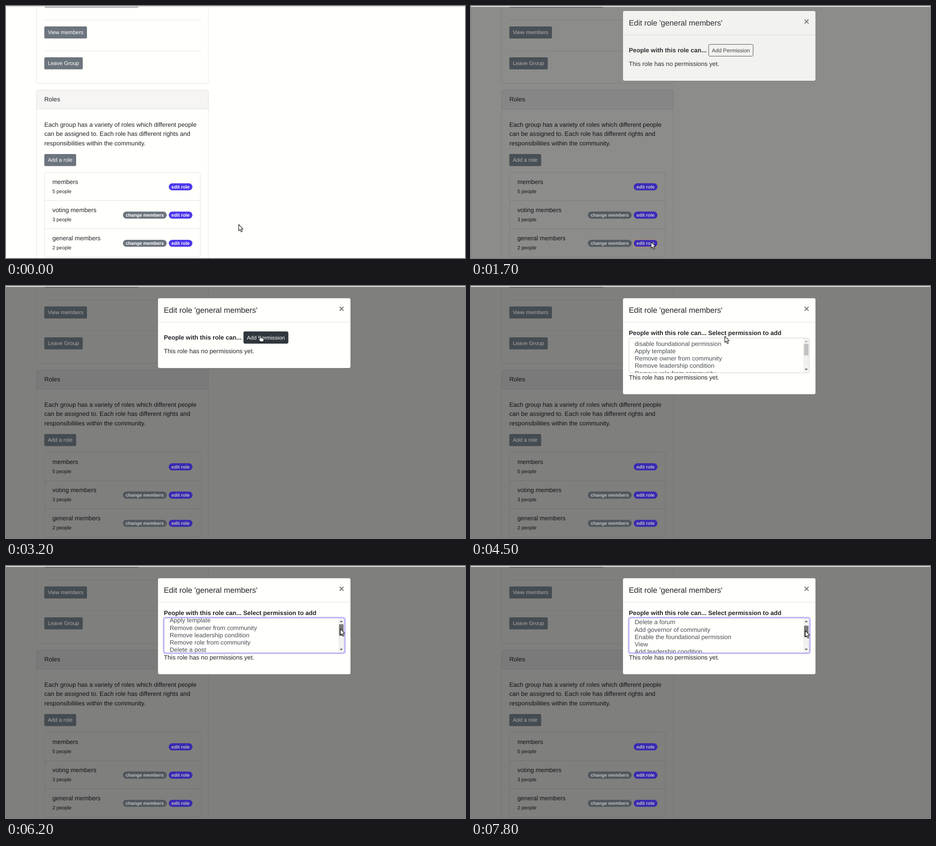
Animation, 1009 px wide and 555 px high, one loop 8 s. Source, as an HTML page:

```html
<!DOCTYPE html>
<html lang="en">
<head>
<meta charset="utf-8">
<title>Edit role dialog</title>
<style>
html, body { margin: 0; width: 100%; height: 100%; overflow: hidden; background: #fffffb; }
svg { display: block; width: 1009px; height: 555px; }
text {
  font: 13.6px "Liberation Sans", Arial, sans-serif;
  fill: #212529;
  text-rendering: geometricPrecision;
  white-space: pre;
}
.small { font-size: 10.88px; }
.bold { font-weight: 700; }
.title { font-size: 17px; }
.close { font-size: 20.4px; font-weight: 700; fill: #000; opacity: .5; }
.btn rect { fill: #6c757d; }
.btn text { font-size: 11.9px; fill: #fff; }
.badge rect { fill: #6c757d; }
.badge .main { fill: #4c38ec; }
.badge text { font-size: 10.2px; font-weight: 700; fill: #fff; }
.line { fill: none; stroke: #000; stroke-opacity: .125; stroke-width: .9; }
.options text { fill: #495057; }

.anim, .anim * { animation: 8s step-end infinite; }
#dim { opacity: 0; animation-name: dim; }
#modal { opacity: 0; animation-name: modal; }
#panel { height: 154.6px; animation-name: panel; }
#outline { opacity: 0; animation-name: outline; }
#ask { animation-name: ask; }
#pick { opacity: 0; animation-name: pick; }
#add { fill: #fffffb; animation-name: add; }
#addText { font-size: 11.9px; fill: #343a40; animation-name: addText; }
#list { animation-name: list; }
#thumb { fill: #c1c1c1; animation-name: thumb; }
#up { fill: #a3a3a3; animation-name: up; }
#ring { opacity: 0; animation-name: ring; }
#cursor { animation-name: cursor; }
#arrow { animation-name: arrow; }
#hand { opacity: 0; animation-name: hand; }
#cursor path { fill: #fff; stroke: #111; stroke-width: 1.15; stroke-linejoin: round; }

@keyframes dim { 21.25% { opacity: .9 } 22.5% { opacity: 1 } 100% { opacity: 1 } }
@keyframes modal {
  0% { opacity: 0; transform: translateY(-42px) }
  21.25% { opacity: .89; transform: translateY(-16px) }
  22.5% { opacity: 1; transform: translateY(-4px) }
  23.75%, 100% { opacity: 1; transform: none }
}
@keyframes panel { 56.25%, 100% { height: 212.3px } }
@keyframes outline { 21.25% { opacity: 1 } 22.5% { opacity: 0 } }
@keyframes ask { 56.25%, 100% { opacity: 0 } }
@keyframes pick { 56.25%, 100% { opacity: 1 } }
@keyframes add {
  33.75% { fill: #8f9394 }
  35% { fill: #30373d }
  51.25%, 100% { fill: #252b30 }
}
@keyframes addText { 33.75%, 100% { fill: #fff } }
@keyframes list {
  0% { transform: none }
  77.5% { transform: translateY(-23.4px) }
  78.75% { transform: translateY(-46.8px) }
  81.25% { transform: translateY(-70.2px) }
  83.75% { transform: translateY(-93.6px) }
  86.25%, 100% { transform: translateY(-117px) }
}
@keyframes thumb {
  0% { transform: none; fill: #c1c1c1 }
  66.25% { transform: none; fill: #a8a8a8 }
  75% { transform: none; fill: #787878 }
  77.5% { transform: translateY(.8px); fill: #787878 }
  78.75% { transform: translateY(1.6px); fill: #787878 }
  81.25% { transform: translateY(2.3px); fill: #787878 }
  83.75% { transform: translateY(3.1px); fill: #787878 }
  86.25%, 100% { transform: translateY(3.9px); fill: #787878 }
}
@keyframes up { 77.5%, 100% { fill: #505050 } }
@keyframes ring { 75% { opacity: .5 } 76.25%, 100% { opacity: 1 } }
@keyframes cursor {
  0% { transform: translate(511px, 480.5px) }
  7.5% { transform: translate(506px, 482px) }
  8.75% { transform: translate(486px, 491px) }
  10% { transform: translate(458px, 502px) }
  11.25% { transform: translate(431px, 510px) }
  12.5% { transform: translate(411px, 515px) }
  13.75% { transform: translate(395px, 518px) }
  15% { transform: translate(391px, 518.5px) }
  21.25% { transform: translate(395.5px, 519px) }
  23.75% { transform: translate(402px, 515px) }
  25% { transform: translate(455px, 484px) }
  26.25% { transform: translate(545px, 422px) }
  27.5% { transform: translate(617px, 364px) }
  30% { transform: translate(585px, 230px) }
  31.25% { transform: translate(564px, 122px) }
  33.75% { transform: translate(566px, 113px) }
  35% { transform: translate(568px, 105px) }
  37.5% { transform: translate(564px, 106px) }
  38.75% { transform: translate(558px, 107px) }
  40% { transform: translate(554px, 108px) }
  56.25% { transform: translate(557.5px, 110px) }
  60% { transform: translate(576px, 117px) }
  61.25% { transform: translate(631px, 136px) }
  62.5% { transform: translate(700px, 150px) }
  63.75% { transform: translate(739px, 153px) }
  66.25% { transform: translate(738px, 151px) }
  67.5% { transform: translate(736px, 147px) }
  68.75% { transform: translate(735px, 143px) }
  70% { transform: translate(734.5px, 141.3px) }
  71.25% { transform: translate(734.5px, 138.5px) }
  72.5% { transform: translate(734.5px, 137px) }
  77.5% { transform: translate(734.5px, 137.8px) }
  78.75% { transform: translate(734.5px, 138.7px) }
  81.25% { transform: translate(734.5px, 139.6px) }
  83.75% { transform: translate(734.5px, 140.5px) }
  86.25% { transform: translate(734.5px, 141.3px) }
  87.5% { transform: translate(735.3px, 141.6px) }
  97.5%, 100% { transform: translate(734.5px, 141.8px) }
}
@keyframes arrow {
  0% { opacity: 1 } 13.75% { opacity: 0 } 21.25% { opacity: 1 }
  31.25% { opacity: 0 } 56.25%, 100% { opacity: 1 }
}
@keyframes hand {
  0% { opacity: 0 } 13.75% { opacity: 1 } 21.25% { opacity: 0 }
  31.25% { opacity: 1 } 56.25%, 100% { opacity: 0 }
}
</style>
</head>
<body>
<svg viewBox="0 0 1009 555">
  <defs>
    <clipPath id="box"><rect x="348" y="115.2" width="382.5" height="75.6"/></clipPath>
  </defs>
  <rect width="1009" height="555" fill="#fffffb"/>

  <!-- page -->
  <rect class="line" x="66.9" y="-20" width="378" height="190.5" rx="3.4"/>
  <path class="line" d="M84 30.8H427.5M84 98.8H427.5"/>
  <rect x="67" y="185" width="378" height="41.8" rx="3" fill="#f6f5f4"/>
  <rect class="line" x="66.9" y="185" width="378" height="400" rx="3.4"/>
  <path class="line" d="M67 226.9H445"/>
  <text x="84.2" y="210.4">Roles</text>
  <text x="84.2" y="265.7">Each group has a variety of roles which different people</text>
  <text x="84.2" y="286.1">can be assigned to. Each role has different rights and</text>
  <text x="84.2" y="306.5">responsibilities within the community.</text>

  <rect class="line" x="84.5" y="366.5" width="342.6" height="186.2" rx="3.4"/>
  <path class="line" d="M84.5 428.6H427M84.5 490.6H427"/>
  <text x="102" y="391.9">members</text>
  <text x="102" y="412.1" class="small">5 people</text>
  <text x="102" y="454">voting members</text>
  <text x="102" y="474.2" class="small">3 people</text>
  <text x="102" y="516">general members</text>
  <text x="102" y="536.3" class="small">2 people</text>

  <g id="buttons" class="btn">
    <rect x="84.2" y="-23" width="207.6" height="26.3" rx="2.7"/>
    <rect x="84.2" y="45" width="93.8" height="26.5" rx="2.7"/>
    <text x="91.9" y="62.2">View members</text>
    <rect x="84.2" y="113" width="84.5" height="26.5" rx="2.7"/>
    <text x="91.9" y="130.3">Leave Group</text>
    <rect x="84.2" y="326" width="70" height="26.5" rx="2.7"/>
    <text x="91.9" y="343.2">Add a role</text>
  </g>
  <g id="badges" class="badge">
    <rect class="main" x="357.8" y="390.6" width="52" height="15.4" rx="7.7"/>
    <text x="363.8" y="401.9">edit role</text>
    <rect x="257" y="452.8" width="96.3" height="15.4" rx="7.7"/>
    <text x="263.2" y="464.1">change members</text>
    <rect class="main" x="357.8" y="452.8" width="52" height="15.4" rx="7.7"/>
    <text x="363.8" y="464.1">edit role</text>
    <rect x="257" y="514.9" width="96.3" height="15.4" rx="7.7"/>
    <text x="263.2" y="526.2">change members</text>
    <rect class="main" x="357.8" y="514.9" width="52" height="15.4" rx="7.7"/>
    <text x="363.8" y="526.2">edit role</text>
  </g>

  <g class="anim">
    <g id="dim">
      <rect width="1009" height="555" opacity=".5"/>
      <use href="#buttons" opacity=".3"/>
      <use href="#badges" opacity=".5"/>
    </g>
    <rect id="outline" x="357.3" y="514.8" width="52.8" height="15.6" rx="1.5" fill="none" stroke="#c58a62"/>

    <g id="modal">
      <rect id="panel" x="333.7" y="26.5" width="424" rx="4" fill="#fffffb" stroke="#000" stroke-opacity=".35" stroke-width=".9"/>
      <text x="347" y="58.8" class="title">Edit role 'general members'</text>
      <text x="731.7" y="57" class="close">×</text>
      <path d="M334.2 79.5H757.3" stroke="#dfe0e0"/>

      <g id="ask">
        <text x="347" y="117.6" class="bold">People with this role can...</text>
        <rect id="add" x="522.4" y="100.5" width="97.8" height="26" rx="2.7" stroke="#343a40" stroke-width=".9"/>
        <text id="addText" x="529.6" y="117.5">Add Permission</text>
        <text x="347" y="147.9">This role has no permissions yet.</text>
      </g>

      <g id="pick">
        <text x="347" y="108" class="bold">People with this role can... Select permission to add</text>
        <rect x="347.5" y="114.6" width="396.4" height="76.7" rx="3.4" fill="#fffffb" stroke="#c6cacd" stroke-width=".9"/>
        <g clip-path="url(#box)">
          <g id="list" class="options">
            <text x="359.8" y="131.6">disable foundational permission</text>
            <text x="359.8" y="147.85">Apply template</text>
            <text x="359.8" y="164.1">Remove owner from community</text>
            <text x="359.8" y="180.35">Remove leadership condition</text>
            <text x="359.8" y="196.6">Remove role from community</text>
            <text x="359.8" y="212.85">Delete a post</text>
            <text x="359.8" y="229.1">Add owner to community</text>
            <text x="359.8" y="245.35">Delete a forum</text>
            <text x="359.8" y="261.6">Add governor of community</text>
            <text x="359.8" y="277.85">Enable the foundational permission</text>
            <text x="359.8" y="294.1">View</text>
            <text x="359.8" y="310.35">Add leadership condition</text>
          </g>
        </g>
        <rect x="730.6" y="115.2" width="12.7" height="75.6" fill="#f1f1ef"/>
        <path id="up" d="M733.6 123.6H740.4L737 120.2Z"/>
        <path d="M733.6 182.2H740.4L737 185.6Z" fill="#505050"/>
        <rect id="thumb" x="732.2" y="127.5" width="9.7" height="25.2"/>
        <g id="ring" fill="none">
          <rect x="346" y="113" width="399.6" height="79.8" rx="4.5" stroke="#c9c4fc" stroke-width="2.6"/>
          <rect x="347.6" y="114.6" width="396.4" height="76.6" rx="3.4" stroke="#a097f3" stroke-width=".9"/>
        </g>
        <text x="347" y="206">This role has no permissions yet.</text>
      </g>
    </g>

    <g id="cursor">
      <path id="arrow" d="M.5 .7V14.4L3.6 11.6 6 16.9 8.4 15.8 6 10.7H10Z"/>
      <path id="hand" d="M3.6 9.2V2a1.25 1.25 0 0 1 2.5 0V6.2q2-.8 2.4.6 1.9-.5 2.2.7 1.9-.2 1.9 1.3v2.4q0 1.6-1 3.5H5.2Q3.8 12.6 .9 9.6q-.4-1.6 1.1-1.5Z"/>
    </g>
  </g>

  <!-- browser edge -->
  <rect width="1009" height="1" fill="#f4f4f1"/>
  <rect y="1" width="1009" height="1" fill="#d3d2cf"/>
</svg>
</body>
</html>
```
